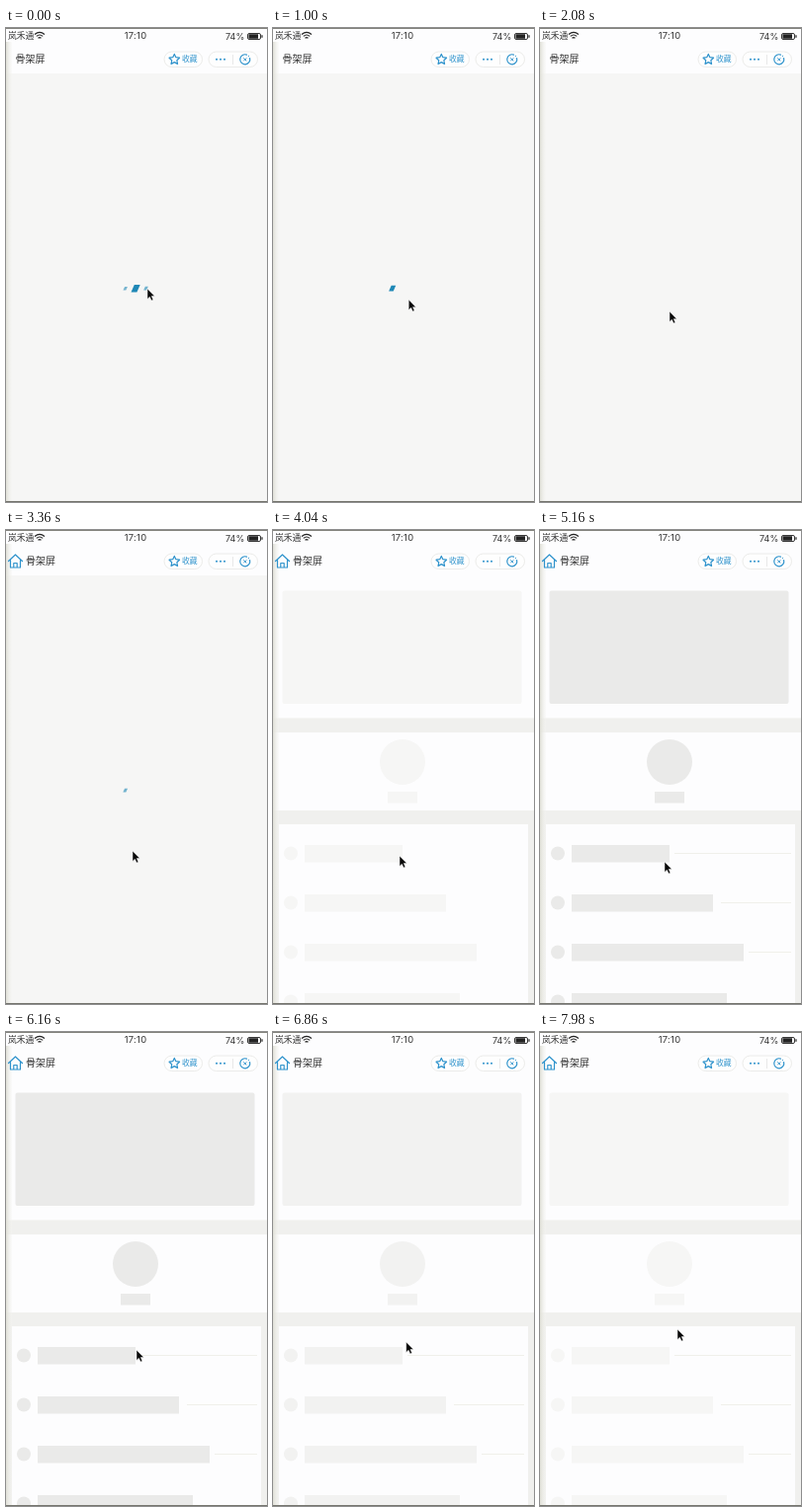
Recreate the animation shown at these times as an HTML page. Size 264 px wide and 480 px high, loop 8000 ms.

```html
<!DOCTYPE html>
<html lang="zh">
<head>
<meta charset="utf-8">
<title>骨架屏</title>
<style>
  html, body { margin: 0; width: 100%; height: 100%; overflow: hidden; background: #f6f6f5; }
  svg { display: block; width: 100vw; height: 100vh; }
  text { font-family: "Noto Sans CJK SC", "Noto Sans CJK", "Noto Sans", sans-serif; fill: #333; }
  .latin { font-family: Inter, Roboto, sans-serif; }
  .icon { fill: none; stroke: #2f93cc; stroke-width: 1.2; stroke-linejoin: round; stroke-linecap: round; }
  .capsule { fill: #fefefe; stroke: #ececea; }
</style>
</head>
<body>
<svg viewBox="0 0 264 480" preserveAspectRatio="none">
  <defs>
    <linearGradient id="edge">
      <stop offset="0" stop-color="#dfdfd6"/>
      <stop offset="1" stop-color="#f5f5f2" stop-opacity=".3"/>
    </linearGradient>
  </defs>

  <rect width="264" height="480" fill="#f6f6f5"/>

  <g id="skeleton">
    <rect y="46" width="264" height="434" fill="#fdfdfe"/>
    <path d="M0 190.500H264V205H0zM0 284H264V480H258V298H6V480H0z" fill="#f0f0ee"/>
    <g id="blocks">
      <rect x="9.500" y="61.500" width="242" height="114.500" rx="2"/>
      <circle cx="131" cy="235" r="23"/>
      <rect x="116" y="265" width="30" height="11.500"/>
    </g>
    <path id="rules" d="M136 327.500H254M183 377.500H254M211 427.500H254" stroke="#f0f0ea"/>
  </g>

  <g id="loader" fill="#1f88b6"></g>

  <rect width="264" height="46" fill="#fdfdfe"/>
  <rect y="14" width="6" height="466" fill="url(#edge)"/>
  <path d="M0 .4H264M0 479.500H264" stroke="#777770"/>

  <text x="2" y="11.300" font-size="8.800">岚禾通</text>
  <g fill="none" stroke="#222" stroke-width="1.200">
    <path d="M29 6.500Q34 2.300 39 6.500M30.800 8.400Q34 5.600 37.200 8.400M32.500 10.200Q34 9 35.500 10.200"/>
    <rect x="244.500" y="5.500" width="13" height="6" rx="1.500" stroke-width=".9"/>
    <path d="M245.500 8.500H255" stroke-width="4.500"/>
    <path d="M259 7.300V9.700"/>
  </g>
  <text class="latin" x="131" y="11.300" font-size="9.400" text-anchor="middle" letter-spacing=".3">17:10</text>
  <text class="latin" x="222" y="11.500" font-size="9">74%</text>

  <path id="home" class="icon" d="M2.500 31.500L9.500 25L16.500 31.500M4.500 30.500V38H14.500V30.500M7.800 38V33.500H11.200V38"/>
  <text id="title" y="35.300" font-size="10" font-weight="500">骨架屏</text>

  <rect class="capsule" x="160" y="24" width="38.500" height="15.500" rx="7.700"/>
  <path id="star" class="icon"/>
  <text x="178" y="34.400" font-size="7.800" style="fill:#2f93cc">收藏</text>

  <rect class="capsule" x="205" y="24" width="49.500" height="15.500" rx="7.700"/>
  <path d="M229.500 27V37" stroke="#e8e8e8"/>
  <path d="M213 31.700h.01M217 31.700h.01M221 31.700h.01" class="icon" style="stroke-width:2"/>
  <path class="icon" d="M243.500 27.100A5 5 0 1 0 246.600 30.500M245.500 28.300h.01"/>
  <path class="icon" style="stroke-width:1" d="M240.600 30.600l2.400 2.400m0-2.400l-2.400 2.400"/>

  <path id="cursor" d="M0 0V10.500L2.400 8.300L4.100 12L5.900 11.200L4.300 7.600H7.400z" fill="#090909" stroke="#fff" stroke-width=".5"/>
</svg>

<script>
const LOOP = 8000, HOME_AT = 2240, SKELETON_AT = 3660, RULES_AT = 4180;
const PULSE = 4000, LOADER_CYCLE = 600;
const LIGHT = 247, DARK = 232;
const cursorPath = [
  [0, 143, 264], [2080, 131, 287], [2400, 130, 298], [3360, 128, 325],
  [4040, 128, 330], [5160, 126, 336], [6160, 132, 322], [7980, 139, 301], [LOOP, 139, 301]
];

const $ = id => document.getElementById(id);
const blocks = $('blocks'), loader = $('loader');

function add(parent, name, attributes) {
  const node = document.createElementNS('http://www.w3.org/2000/svg', name);
  for (const key in attributes) node.setAttribute(key, attributes[key]);
  return parent.appendChild(node);
}

[99, 143, 174, 157].forEach((width, i) => {
  const y = 327.5 + i * 50;
  add(blocks, 'circle', { cx: 18, cy: y, r: 7 });
  add(blocks, 'rect', { x: 32, y: y - 8.5, width, height: 17.5 });
});

const bars = [0, 1, 2].map(() => add(loader, 'path', { d: 'M-1.300-3.700H4.600L1.300 3.700H-4.600z' }));

$('star').setAttribute('d', 'M' + Array.from({ length: 10 }, (_, i) => {
  const radius = i % 2 ? 2.7 : 5.5, angle = i * Math.PI / 5;
  return `${170.3 + radius * Math.sin(angle)} ${31.9 - radius * Math.cos(angle)}`;
}).join('L') + 'z');

const show = (node, visible) => node.setAttribute('visibility', visible ? 'visible' : 'hidden');

// The bars swell one after another, then all rest for a moment.
function drawLoader(t) {
  const phase = (t / LOADER_CYCLE + 0.5) % 1;
  bars.forEach((bar, i) => {
    const local = (phase - i * 0.2) / 0.6;
    const scale = local > 0 && local < 1 ? Math.sin(local * Math.PI) : 0;
    bar.setAttribute('transform', `translate(${120.7 + i * 10.4} 263.700) scale(${scale})`);
    bar.setAttribute('opacity', Math.max(0, Math.min(1, scale * 2 - 0.4)));
  });
}

function drawCursor(t) {
  const next = cursorPath.findIndex(point => point[0] > t);
  const [t0, x0, y0] = cursorPath[next - 1], [t1, x1, y1] = cursorPath[next];
  const k = (t - t0) / (t1 - t0);
  $('cursor').setAttribute('transform', `translate(${x0 + (x1 - x0) * k} ${y0 + (y1 - y0) * k})`);
}

function draw(t) {
  const loaded = t >= SKELETON_AT, hasHome = t >= HOME_AT;
  show($('skeleton'), loaded);
  show(loader, !loaded);
  show($('home'), hasHome);
  show($('rules'), t >= RULES_AT);
  $('title').setAttribute('x', hasHome ? 20 : 9.5);

  const depth = (1 - Math.cos((t - SKELETON_AT) / PULSE * 2 * Math.PI)) / 2;
  const grey = LIGHT + (DARK - LIGHT) * depth;
  blocks.setAttribute('fill', `rgb(${grey}, ${grey}, ${grey - 1})`);
  drawLoader(t);
  drawCursor(t);
}

const start = performance.now();
function tick() {
  draw((performance.now() - start) % LOOP);
  requestAnimationFrame(tick);
}
tick();
</script>
</body>
</html>
```
